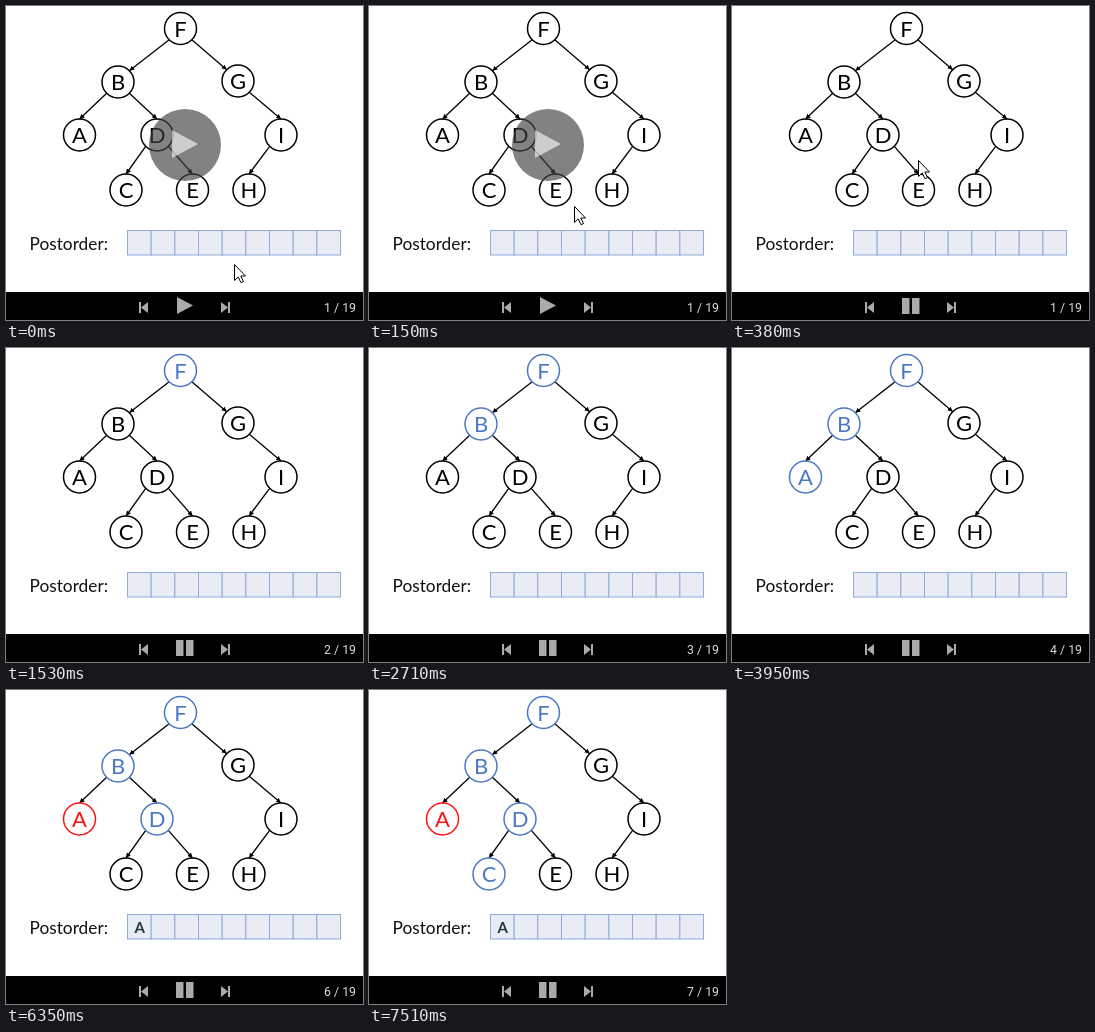
These frames come from a looping animation (357x314 px, 8 s). An HTML page:

```html
<!DOCTYPE html>
<html>
<head>
<meta charset="utf-8">
<style>
  html, body { margin: 0; width: 100%; height: 100%; overflow: hidden; background: #fff; }
  svg { display: block; width: 357px; height: 314px; }
  text { font-family: Lato, sans-serif; }
  .node { fill: none; stroke: currentColor; stroke-width: 1.5; }
  .letter { font-size: 22px; text-anchor: middle; fill: currentColor; }
</style>
</head>
<body>
<svg viewBox="0 0 357 314">
  <defs>
    <marker id="head" viewBox="0 0 6 6" refX="6" refY="3" markerWidth="5" markerHeight="5" markerUnits="userSpaceOnUse" orient="auto">
      <path d="M0 0L6 3L0 6Z"/>
    </marker>
  </defs>
  <rect width="357" height="314" fill="#fff"/>
  <g id="edges" stroke="#000" stroke-width="1.3" marker-end="url(#head)"></g>
  <g id="nodes"></g>
  <text x="23.5" y="243.5" font-size="17.3" fill="#111">Postorder:</text>
  <g id="cells" fill="#e9ebf5" stroke="#8faadc"></g>
  <text id="visited" x="133.7" y="242.5" font-size="15" font-weight="bold" text-anchor="middle" fill="#263a35">A</text>

  <rect y="286" width="357" height="28" fill="#000"/>
  <g fill="#aaa">
    <path d="M133 296h2v11h-2zM142 296v11l-7 -5.5zM222 296h2v11h-2zM215 296v11l7 -5.5z"/>
    <path id="play" d="M171 291L187 299.5L171 308Z"/>
    <path id="pause" d="M170 292h7.5v16h-7.5zM180 292h7.5v16h-7.5z"/>
  </g>
  <text id="counter" x="350" y="306" text-anchor="end" fill="#ddd" style="font: 12.3px Roboto, sans-serif"></text>

  <g id="overlay">
    <circle cx="179" cy="139" r="36" fill="#404040" opacity=".65"/>
    <path d="M166 124L192 138L166 152Z" fill="#fff" opacity=".6"/>
  </g>
  <g id="cursor" fill="#fff" stroke="#000" stroke-linejoin="round">
    <path id="arrow" d="M.5 .5V16.5L4.2 13L7 18.7L9.5 17.5L6.8 12H11.5Z"/>
    <path id="hand" d="M-2 1.5Q0 -1 2 1.5V8Q4 6.5 5.5 9Q7.5 7.8 8.5 10Q11 9.5 11 12V17L9 20V23.5H-1V20.5L-6.5 14Q-7 10.5 -4 12L-2 14Z"/>
  </g>
</svg>
<script>
const LOOP = 8000, R = 16;
const BLUE = '#4b78c5', RED = '#f11';
const positions = {
  F: [174.5, 22.5], B: [112, 76], G: [232, 75], A: [73.5, 129], D: [151, 129],
  I: [275, 129], C: [120, 184], E: [186.5, 184], H: [243, 184]
};
// Slide start times and the node recoloured on each one.
const slides = [
  [0], [1530, 'F', BLUE], [2710, 'B', BLUE], [3950, 'A', BLUE],
  [5110, 'A', RED], [6350, 'D', BLUE], [7510, 'C', BLUE]
];
// Pointer steps: time, x, y, shape.
const pointer = [
  [0, 228, 258, 'arrow'], [70, 222, 240, 'arrow'], [150, 205, 200, 'arrow'],
  [240, 190, 165, 'hand'], [320, 187, 155, 'hand'], [380, 186, 154, 'arrow'],
  [460, 274, 250, 'arrow'], [540, 0, 0, 'none']
];

const $ = id => document.getElementById(id);
function add(parent, tag, attrs, text = '') {
  const el = document.createElementNS('http://www.w3.org/2000/svg', tag);
  for (const key in attrs) el.setAttribute(key, attrs[key]);
  el.textContent = text;
  return parent.appendChild(el);
}
const show = (id, on) => { $(id).style.display = on ? '' : 'none'; };

const diagonal = R * Math.SQRT1_2;
for (const [from, to] of ['FB', 'FG', 'BA', 'BD', 'GI', 'DC', 'DE', 'IH']) {
  const [x1, y1] = positions[from], [x2, y2] = positions[to];
  const side = Math.sign(x2 - x1), fromRoot = from === 'F';
  add($('edges'), 'line', {
    x1: x1 + side * diagonal, y1: y1 + diagonal,
    x2: x2 - (fromRoot ? side * diagonal : 0), y2: y2 - (fromRoot ? diagonal : R),
    'marker-end': 'url(#head)'
  });
}

const nodes = {};
for (const [name, [x, y]] of Object.entries(positions)) {
  const group = nodes[name] = add($('nodes'), 'g', {});
  add(group, 'circle', { class: 'node', cx: x, cy: y, r: R });
  add(group, 'text', { class: 'letter', x, y: y + 8 }, name);
}
for (let i = 0; i < 9; i++) {
  add($('cells'), 'rect', { x: 121.5 + i * 23.67, y: 224.5, width: 23.67, height: 24.5 });
}

function draw(now) {
  const t = now % LOOP;
  const shown = slides.filter(([start]) => start <= t);
  for (const name in nodes) nodes[name].style.color = '#000';
  for (const [, name, color] of shown) if (name) nodes[name].style.color = color;
  $('counter').textContent = shown.length + ' / 19';
  show('visited', shown.length >= 5);

  const playing = t >= 380;
  show('overlay', !playing);
  show('play', !playing);
  show('pause', playing);

  const [, x, y, shape] = pointer.filter(([start]) => start <= t).pop();
  $('cursor').setAttribute('transform', `translate(${x} ${y})`);
  show('arrow', shape === 'arrow');
  show('hand', shape === 'hand');
}
function tick() {
  draw(performance.now());
  requestAnimationFrame(tick);
}
tick();
</script>
</body>
</html>
```
